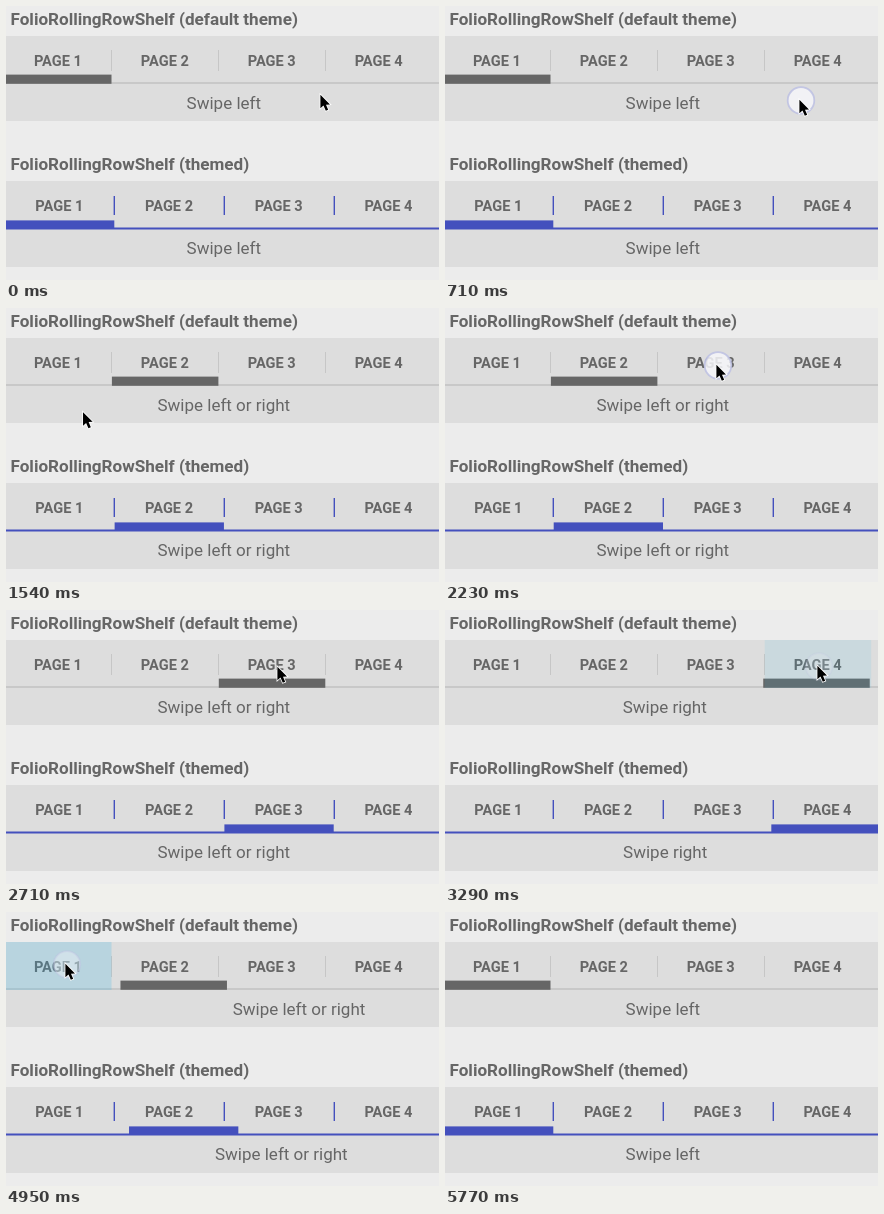
Recreate the animation shown at these times as an HTML page with a canvas. Size 433 by 274 pixels, loop 7.09 s.

```html
<!DOCTYPE html>
<html lang="en">
<head>
<meta charset="utf-8">
<title>Tab strips</title>
<style>
  html, body { margin: 0; width: 100%; height: 100%; overflow: hidden; background: #ececec; }
  canvas { display: block; width: 433px; height: 274px; }
</style>
</head>
<body>
<canvas id="stage" width="433" height="274"></canvas>
<script>
const W = 433, H = 274, LOOP = 7090, TICK = 117.76, LAST = 49, LAG = 17;
const INK = '#666', BLUE = '#4450bd', FONT = 'Roboto, "Noto Sans", sans-serif';
const PAGES = ['Swipe left', 'Swipe left or right', 'Swipe left or right', 'Swipe right'];
const NAME = 'FolioRollingRowShelf';
const ctx = document.getElementById('stage').getContext('2d');

// Vertical extents are [top, bottom]
const plain = {
  title: NAME + ' (default theme)', titleY: 18.8, labelY: 59.8, textY: 103, tab: 106.9,
  panel: [30, 115], bar: [68.6, 77.8], line: [76, 78], split: [44, 65], splitW: 1,
  barColor: INK, lineColor: '#c8c8c8', splitColor: '#c6c6c6'
};
const themed = {
  title: NAME + ' (themed)', titleY: 163.9, labelY: 205.3, textY: 248.3, tab: 109.7,
  panel: [175, 261], bar: [214.4, 223], line: [221.5, 223.5], split: [190, 209], splitW: 1.4,
  barColor: BLUE, lineColor: BLUE, splitColor: BLUE
};

// Finger goes down and up (ms), then the pages settle; the themed strip follows after a delay
const DRAG = { down: 700, up: 1265, from: 0.342, to: 1, delay: 95 };
const TAPS = [
  { down: 2230, up: 2330, from: 1, to: 2, delay: 3 },
  { down: 3055, up: 3165, from: 2, to: 3, delay: 3 },
  { down: 4705, up: 4855, from: 3, to: 0, delay: 3 }
];
const GESTURES = [DRAG, ...TAPS];

// Cursor moves: start tick, end tick, x, y
const MOVES = [
  [1, 4, 354, 94], [6, 12.2, 66, 107], [12.2, 18, 271, 57], [24, 26, 372, 56],
  [29, 31, 292, 68], [32.5, 38, 59, 52], [45, 48.6, 385, 285]
];

const clamp = v => Math.max(0, Math.min(1, v));
const smooth = v => (v = clamp(v)) * v * (3 - 2 * v);

function cursorAt(k) {
  let x = 314, y = 89;
  for (const [a, b, toX, toY] of MOVES) {
    const p = smooth((k - a) / (b - a));
    x += (toX - x) * p;
    y += (toY - y) * p;
  }
  return [x, y];
}

// Quintic ease-out; longer jumps take longer
function settle(ms, start, from, to) {
  const p = clamp((ms - start) / ((Math.abs(to - from) + 1) * 100));
  return to + (from - to) * Math.pow(1 - p, 5);
}

function plainPos(ms) {
  const drag = DRAG.from * smooth((ms - 760) / 418);
  return GESTURES.reduce((pos, g) => ms < g.up ? pos : settle(ms, g.up, g.from, g.to), drag);
}

function themedPos(ms) {
  return GESTURES.reduce((pos, g) => {
    const start = g.up + g.delay;
    return ms < start ? pos : settle(ms, start, Math.round(g.from), g.to);
  }, 0);
}

function box(color, x, y, w, h) {
  ctx.fillStyle = color;
  ctx.fillRect(x, y, w, h);
}

function band(color, [top, bottom], x = 0, w = W) {
  box(color, x, top, w, bottom - top);
}

function label(str, x, y, font, align = 'center') {
  ctx.font = font + ' ' + FONT;
  ctx.textAlign = align;
  ctx.fillStyle = INK;
  ctx.fillText(str, x, y);
}

const tabX = (s, i) => i * s.tab - 1;

function drawStrip(s, position, ms) {
  const pos = position(ms);
  label(s.title, 4.5, s.titleY, 'bold 17.1px', 'left');
  band('#ddd', s.panel);
  band(s.lineColor, s.line);
  band(s.barColor, s.bar, tabX(s, position(ms - LAG)), s.tab - 0.4);
  PAGES.forEach((text, i) => {
    const x = tabX(s, i);
    if (i) band(s.splitColor, s.split, Math.floor(x) + 1 - s.splitW, s.splitW);
    label('PAGE ' + (i + 1), x + s.tab / 2 - 0.5, s.labelY, 'bold 14.6px');
    label(text, 217.8 + (i - pos) * W, s.textY, '17px');
  });
}

function drawGlow(ms) {
  for (const g of TAPS) {
    const a = ms > g.down + TICK / 2 ? 0.21 * clamp((g.up + 177 - ms) / 86) : 0;
    band(`rgba(51,181,229,${a})`, [30, 78], tabX(plain, g.to), plain.tab - 0.4);
  }
}

function drawDot(ms) {
  const touch = GESTURES.find(g => ms >= g.down && ms < g.up + 165);
  if (!touch) return;
  const [x, y] = cursorAt(ms / TICK - 0.37);
  ctx.globalAlpha = clamp(1 - (ms - touch.up) / 165);
  ctx.beginPath();
  ctx.arc(x + 2, y + 0.4, 13.3, 0, 7);
  ctx.fillStyle = 'rgba(246,246,249,.85)';
  ctx.fill();
  ctx.lineWidth = 1.8;
  ctx.strokeStyle = 'rgba(188,192,226,.85)';
  ctx.stroke();
  ctx.globalAlpha = 1;
}

function drawCursor(k) {
  if (k >= LAST) return;
  const [x, y] = cursorAt(k);
  ctx.save();
  ctx.translate(x + 0.4, y - 0.2);
  ctx.beginPath();
  [[0, 0], [0, 13.5], [3.1, 10.7], [5.4, 16], [7.8, 15], [5.6, 9.9], [9.6, 9.6]]
    .forEach(p => ctx.lineTo(...p));
  ctx.closePath();
  ctx.lineWidth = 1.6;
  ctx.strokeStyle = '#fff';
  ctx.stroke();
  ctx.fillStyle = '#000';
  ctx.fill();
  ctx.restore();
}

// The picture advances in even ticks, then rests until the loop ends
function draw(now) {
  const k = Math.min(LAST, Math.floor((now % LOOP) / TICK + 0.1));
  const ms = k * TICK;
  box('#ececec', 0, 0, W, H);
  drawStrip(plain, plainPos, ms);
  drawStrip(themed, themedPos, ms);
  drawGlow(ms);
  drawDot(ms);
  drawCursor(k);
}

let start;
function loop(now) {
  if (start === undefined) start = now;
  draw(now - start);
  requestAnimationFrame(loop);
}
draw(0);
requestAnimationFrame(loop);
</script>
</body>
</html>
```
